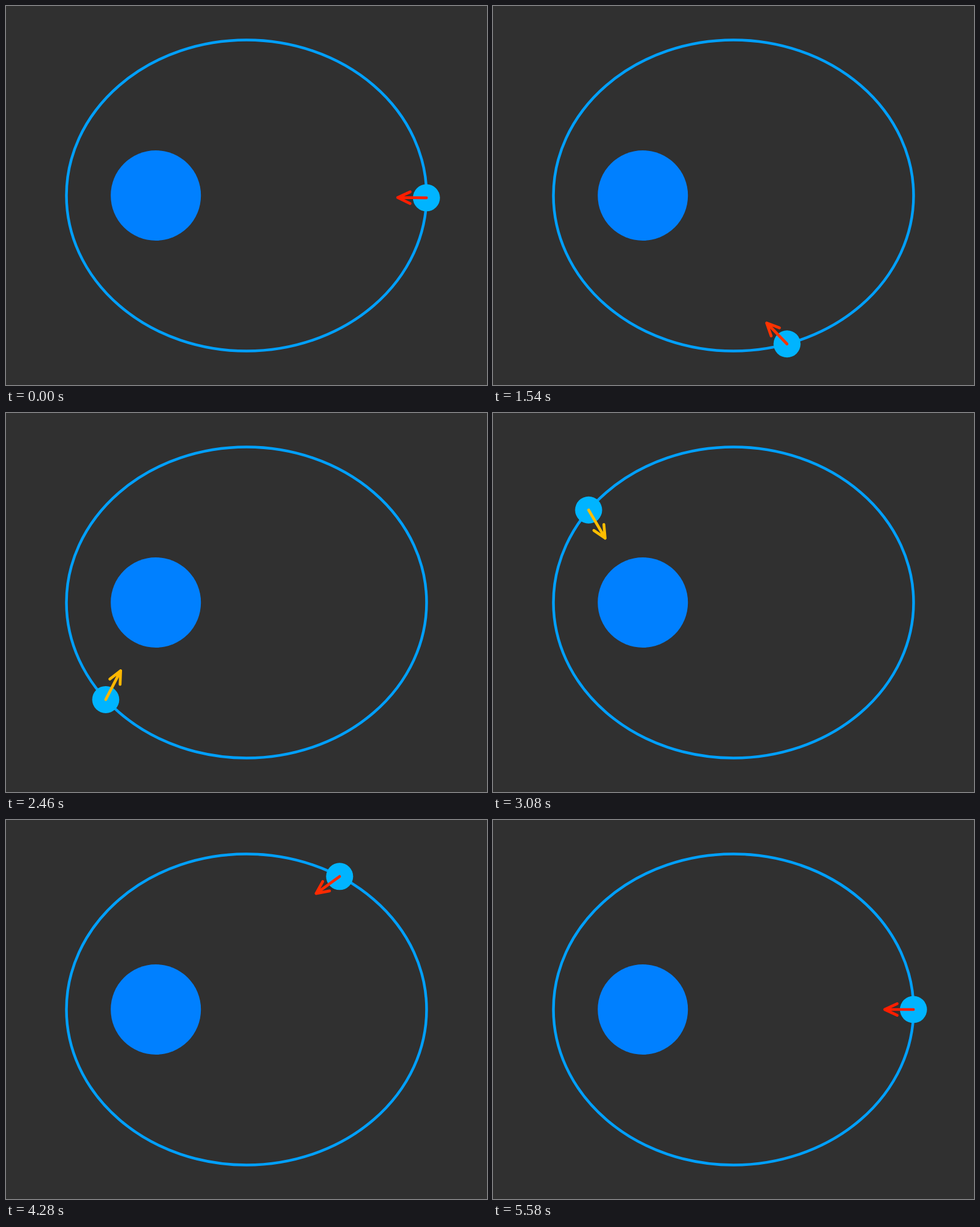
Recreate the animation shown at these times as an HTML page. Size 800 by 630 pixels, loop 5600 ms.

```html
<!DOCTYPE html>
<html lang="en">
<head>
<meta charset="utf-8">
<title>Elliptical orbit</title>
<style>
  html, body { margin: 0; width: 100%; height: 100%; overflow: hidden; background: #303030; }
  svg { display: block; width: 800px; height: 630px; }
</style>
</head>
<body>
<svg viewBox="0 0 800 630">
  <rect width="800" height="630" fill="#303030"/>
  <ellipse cx="400" cy="315" rx="299.5" ry="258.5" fill="none" stroke="#00a0ff" stroke-width="4.5"/>
  <circle cx="249.2" cy="315" r="75" fill="#0080ff"/>
  <circle id="planet" r="22.5" fill="#00b4ff"/>
  <path id="arrow" fill="none" stroke-width="4.7" stroke-linecap="round" stroke-linejoin="round"/>
</svg>
<script>
const PERIOD = 5600, STEP = 20;
const orbit = { x: 399.8, y: 315, a: 299.5, b: 258.5, e: 0.505 };
const sun = { x: 249.2, y: 315 };
const WING = 22.8, SPREAD = 25 * Math.PI / 180;
const planet = document.getElementById('planet');
const arrow = document.getElementById('arrow');

// Kepler's equation with angles measured from the far end of the orbit
function eccentricAngle(mean) {
  let angle = mean;
  for (let i = 0; i < 12; i++) {
    angle -= (angle + orbit.e * Math.sin(angle) - mean) / (1 + orbit.e * Math.cos(angle));
  }
  return angle;
}

const ahead = (p, angle, dist) => ({
  x: p.x + dist * Math.cos(angle),
  y: p.y + dist * Math.sin(angle)
});
const point = p => p.x.toFixed(2) + ' ' + p.y.toFixed(2);

function draw(time) {
  const step = Math.floor(time % PERIOD / STEP) + 1;
  const angle = eccentricAngle(2 * Math.PI * step * STEP / PERIOD);
  const pos = {
    x: orbit.x + orbit.a * Math.cos(angle),
    y: orbit.y + orbit.b * Math.sin(angle)
  };
  planet.setAttribute('cx', pos.x);
  planet.setAttribute('cy', pos.y);

  // The pull of gravity sets the arrow's length and hue
  const dx = sun.x - pos.x, dy = sun.y - pos.y;
  const pull = 1e6 / (dx * dx + dy * dy);
  const dir = Math.atan2(dy, dx);
  const tip = ahead(pos, dir, 46.5 + 0.25 * pull);
  const left = ahead(tip, dir + Math.PI - SPREAD, WING);
  const right = ahead(tip, dir + Math.PI + SPREAD, WING);
  arrow.setAttribute('d', `M${point(pos)}L${point(tip)}M${point(left)}L${point(tip)}L${point(right)}`);
  arrow.setAttribute('stroke', `hsl(${(1.42 * pull).toFixed(2)}, 100%, 50%)`);
}

const start = performance.now();
function tick() {
  draw(performance.now() - start);
  requestAnimationFrame(tick);
}
tick();
</script>
</body>
</html>
```
